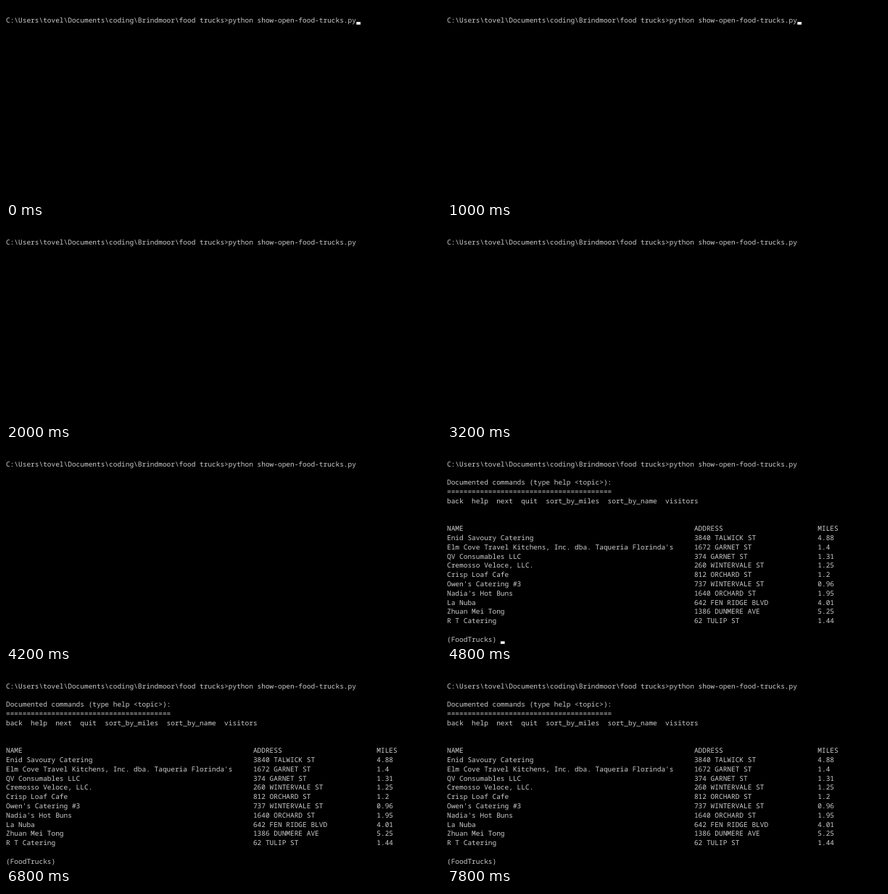
These frames come from a looping animation (600x269 px, 8000 ms). An HTML page:

```html
<!DOCTYPE html>
<html lang="en">
<head>
<meta charset="utf-8">
<title>Terminal</title>
<style>
  html, body { margin: 0; width: 100%; height: 100%; overflow: hidden; background: #000; }
  svg { display: block; width: 600px; height: 269px; }
  text {
    font: 9.475px "Noto Sans Mono", "DejaVu Sans Mono", monospace;
    fill: #ccc;
    white-space: pre;
    text-rendering: geometricPrecision;
  }
  #output { animation: reveal 8s step-end infinite; }
  #cursor { fill: #fff; animation: blink 8s step-end infinite; }

  @keyframes reveal {
    0% { opacity: 0; }
    60%, 100% { opacity: 1; }
  }
  /* The cursor sits after the command, then on the next line, then at the new prompt. */
  @keyframes blink {
    0%, 12.5% { opacity: 1; transform: translate(483.3px, 22.1px); }
    5%, 20% { opacity: 0; transform: translate(483.3px, 22.1px); }
    22.5%, 32.5%, 45% { opacity: 1; transform: translate(0, 34.9px); }
    25%, 40%, 52.5% { opacity: 0; transform: translate(0, 34.9px); }
    60%, 77.5%, 92.5% { opacity: 1; transform: translate(73.9px, 265.3px); }
    72.5%, 85%, 97.5%, 100% { opacity: 0; transform: translate(73.9px, 265.3px); }
  }
</style>
</head>
<body>
<svg viewBox="0 0 600 269">
  <g id="command"></g>
  <g id="output"></g>
  <rect id="cursor" width="5.7" height="3.7"/>
</svg>
<script>
  const LINE_HEIGHT = 12.8;
  const BASELINE = 22.6;

  const trucks = [
    ["NAME", "ADDRESS", "MILES"],
    ["Enid Savoury Catering", "3840 TALWICK ST", "4.88"],
    ["Elm Cove Travel Kitchens, Inc. dba. Taqueria Florinda's", "1672 GARNET ST", "1.4"],
    ["QV Consumables LLC", "374 GARNET ST", "1.31"],
    ["Cremosso Veloce, LLC.", "260 WINTERVALE ST", "1.25"],
    ["Crisp Loaf Cafe", "812 ORCHARD ST", "1.2"],
    ["Owen's Catering #3", "737 WINTERVALE ST", "0.96"],
    ["Nadia's Hot Buns", "1640 ORCHARD ST", "1.95"],
    ["La Nuba", "642 FEN RIDGE BLVD", "4.01"],
    ["Zhuan Mei Tong", "1386 DUNMERE AVE", "5.25"],
    ["R T Catering", "62 TULIP ST", "1.44"]
  ];

  function print(groupId, row, content) {
    const line = document.createElementNS("http://www.w3.org/2000/svg", "text");
    line.setAttribute("y", BASELINE + row * LINE_HEIGHT);
    line.textContent = content;
    document.getElementById(groupId).append(line);
  }

  print("command", 0,
    "C:\\Users\\tovel\\Documents\\coding\\Brindmoor\\food trucks>python show-open-food-trucks.py");
  print("output", 2, "Documented commands (type help <topic>):");
  print("output", 3, "=".repeat(40));
  print("output", 4, "back  help  next  quit  sort_by_miles  sort_by_name  visitors");
  trucks.forEach(([name, address, miles], i) =>
    print("output", 7 + i, name.padEnd(60) + address.padEnd(30) + miles));
  print("output", 19, "(FoodTrucks)");
</script>
</body>
</html>
```
